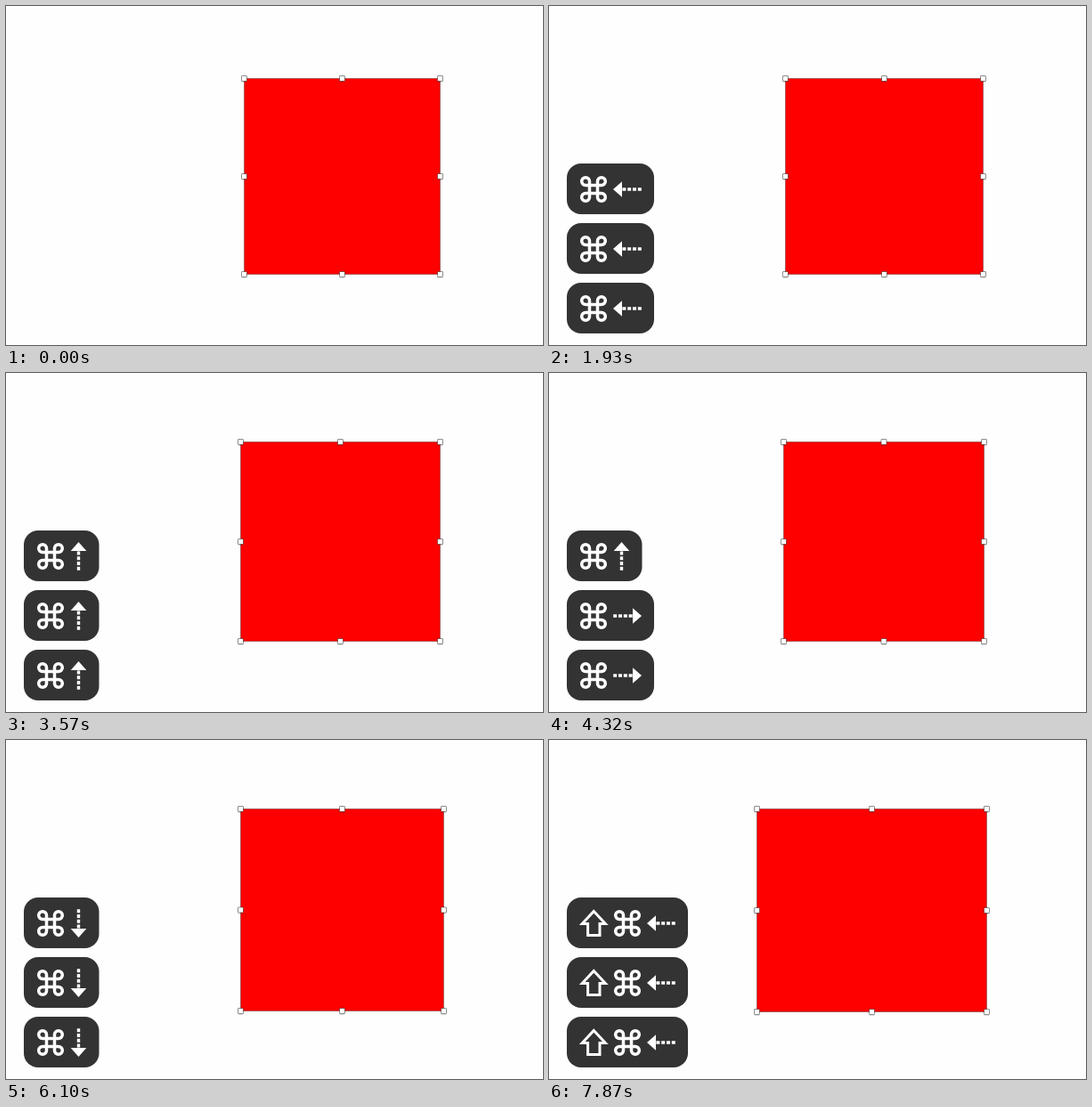
An HTML page that plays this animation: 603 px wide and 381 px high, repeating every 8 s.

```html
<!DOCTYPE html>
<html lang="en">
<head>
<meta charset="utf-8">
<title>Resize with arrow keys</title>
<style>
  html, body { margin: 0; width: 100%; height: 100%; overflow: hidden; background: #fefefe; }
  svg { display: block; }
  .edge { fill: #f00; stroke: #000; stroke-opacity: .3; }
  .handle rect { fill: #fff; stroke: #000; stroke-opacity: .45; }
  .handle path { stroke: #000; stroke-opacity: .14; }
  .plate { fill: #333; }
  .keys { fill: #fff; stroke: #fff; }
  .faded .plate { fill: #616161; }
  .faded .keys { fill: #cacaca; stroke: #cacaca; }
</style>
</head>
<body>
<svg width="603" height="381" viewBox="0 0 603 381">
  <defs>
    <path id="cmd" fill="none" stroke-width="3.5"/>
    <path id="shift" fill="none" stroke-width="3" d="M0-13.5L13 .5H6.7V13.6H-6.7V.5H-13Z"/>
    <g id="arrow">
      <path stroke="none" d="M0 0L10-8.8V8.8Z"/>
      <path fill="none" stroke-width="3.4" stroke-dasharray="4 1.8" d="M10.4 0H32"/>
    </g>
  </defs>
  <g id="box"></g>
  <g id="pills"></g>
</svg>
<script>
const LOOP = 8000, GAP = 295;
const HOLD = 860, GONE = 1010, CLEAR = 5360;

// Each run repeats one key; every press moves one edge by step, lag ms later.
const runs = [
  { key: 'left', at: 1340, count: 4, edge: 'l', step: -1, lag: 150 },
  { key: 'up', at: 2580, count: 4, edge: 't', step: -1, lag: 90 },
  { key: 'right', at: 4025, count: 4, edge: 'r', step: 1, lag: 150 },
  { key: 'down', at: 5505, count: 4, edge: 'b', step: 1, lag: -150 },
  { key: 'left', at: 7130, count: 3, edge: 'l', step: -10, lag: 150, shift: true }
];
const presses = runs.flatMap(run =>
  Array.from({ length: run.count }, (_, i) => ({ ...run, at: run.at + i * GAP })));

const turns = { left: 0, up: 90, right: 180, down: 270 };

const $ = id => document.getElementById(id);

function loopPath(s, r) {
  const e = s + r, arc = `A${r} ${r} 0 1 `;
  return `M${s} ${e}V${-e}${arc}1 ${e} ${-s}H${-e}${arc}1 ${-s} ${-e}` +
    `V${e}${arc}1 ${-e} ${s}H${e}${arc}1 ${s} ${e}Z`;
}
$('cmd').setAttribute('d', loopPath(4.5, 4.4));

function boxAt(time) {
  const box = { l: 267, t: 81, r: 487, b: 301 };
  for (const p of presses) if (time >= p.at + p.lag) box[p.edge] += p.step;
  return box;
}

function drawBox({ l, t, r, b }) {
  let html = `<rect class="edge" x="${l + .5}" y="${t + .5}" width="${r - l}" height="${b - t}"/>`;
  for (const x of [l, (l + r) / 2, r]) {
    for (const y of [t, (t + b) / 2, b]) {
      if (x > l && x < r && y > t && y < b) continue;
      html += `<g class="handle" transform="translate(${x + .5} ${y + .5})">` +
        '<rect x="-3" y="-3" width="6" height="6" rx=".6"/><path d="M-3 4H3"/></g>';
    }
  }
  return html;
}

function drawPill({ key, at, shift }, slot, time) {
  const upright = key === 'up' || key === 'down';
  const indent = shift ? 38 : 0;
  const middle = indent + (upright ? 61.5 : 68);
  return `<g class="${time - at >= HOLD ? 'faded' : ''}" transform="translate(20 ${311 - 67 * slot})">
    <rect class="plate" width="${indent + (upright ? 84.5 : 98)}" height="57" rx="16"/>
    <g class="keys">
      ${shift ? '<use href="#shift" x="30.3" y="29"/>' : ''}
      <use href="#cmd" x="${indent + 30}" y="29"/>
      <use href="#arrow" transform="translate(${middle} 29) rotate(${turns[key]}) translate(-16 0)"/>
    </g></g>`;
}

function drawPills(time) {
  const gone = p => time - p.at >= GONE || (p.at < CLEAR && time >= CLEAR);
  return presses.filter(p => p.at <= time).reverse().slice(0, 3)
    .map((p, slot) => gone(p) ? '' : drawPill(p, slot, time)).join('');
}

const last = {};
function put(id, html) {
  if (last[id] !== html) $(id).innerHTML = last[id] = html;
}

const start = performance.now();
function frame(now) {
  const time = Math.max(0, now - start) % LOOP;
  put('box', drawBox(boxAt(time)));
  put('pills', drawPills(time));
  requestAnimationFrame(frame);
}
frame(start);
</script>
</body>
</html>
```
